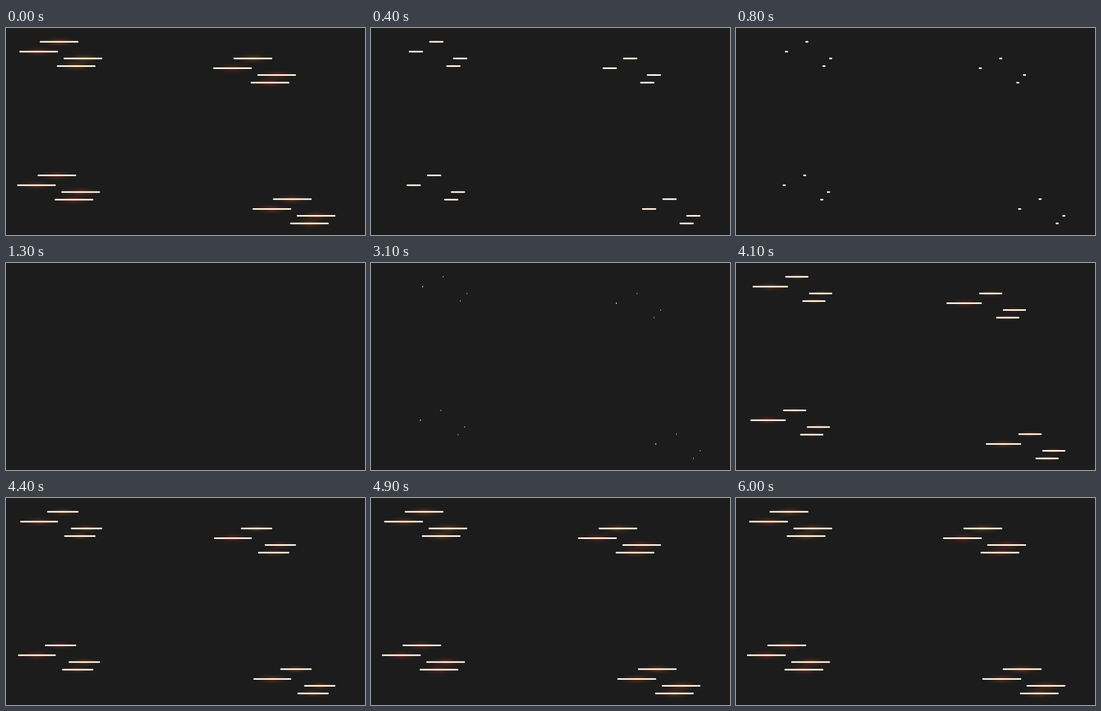
An HTML page with a canvas that plays this animation: 682x394 px, repeating every 6.2 s.

```html
<!DOCTYPE html>
<html lang="en">
<head>
<meta charset="utf-8">
<title>Glowing lines</title>
<style>
  html, body { margin: 0; width: 100%; height: 100%; overflow: hidden; background: #1c1c1c; }
  canvas { display: block; }
</style>
</head>
<body>
<canvas id="stage" width="682" height="394"></canvas>
<script>
const ctx = document.getElementById('stage').getContext('2d');
const LOOP = 6200, STEP = 100, LENGTH = 73.6, THICKNESS = 3;

// Right end and vertical centre of each line within a group
const lines = [[137.5, 26.3], [98.7, 45], [182.7, 57.9], [170, 72.4]];

// Group offset and the glow colour of its four lines
const ORANGE = '255,96,24', AMBER = '235,120,24', EMBER = '255,74,30', RED = '250,54,34';
const groups = [
  { x: 0, y: 0, glow: [ORANGE, EMBER, AMBER, AMBER] },
  { x: 368.2, y: 31.6, glow: [AMBER, RED, RED, RED] },
  { x: -4.2, y: 254.3, glow: [EMBER, RED, EMBER, RED] },
  { x: 443, y: 299.5, glow: [ORANGE, ORANGE, ORANGE, ORANGE] }
];

const clamp = v => Math.min(1, Math.max(0, v));
const progress = (time, start, duration) => clamp((time - start) / duration);
const sineInOut = p => (1 - Math.cos(Math.PI * p)) / 2;

// cubic-bezier(a, 0, b, 1)
const bezier = (a, b) => p => {
  let low = 0, high = 1;
  for (let i = 0; i < 24; i++) {
    const s = (low + high) / 2, r = 1 - s;
    if (3 * r * r * s * a + 3 * r * s * s * b + s * s * s < p) low = s; else high = s;
  }
  return low * low * (3 - 2 * low);
};
const easeShrink = bezier(0.2, 0.15);
const easeGrow = bezier(0.2, 0.11);

function lengthAt(time, index) {
  if (time > LOOP - 30) time -= LOOP;
  if (time < 2000) return LENGTH * (1 - easeShrink(progress(time, -30, 1300)));
  return LENGTH * (index === 1
    ? easeGrow(progress(time, 3020, 1800))
    : sineInOut(progress(time, 2960, 2030)));
}

function drawGlow(x, y, length, color) {
  const gradient = ctx.createRadialGradient(0, 0, 0, 0, 0, 1);
  [0.32, 0.22, 0.1, 0.03, 0].forEach((alpha, i) =>
    gradient.addColorStop(i / 4, `rgba(${color},${alpha})`));
  ctx.save();
  ctx.translate(x - length / 2, y);
  ctx.scale(length / 2, length * 0.15);
  ctx.fillStyle = gradient;
  ctx.fillRect(-1, -1, 2, 2);
  ctx.restore();
}

function drawLine(x, y, length) {
  ctx.fillStyle = '#fff5e4';
  ctx.beginPath();
  ctx.roundRect(x - length, y - THICKNESS / 2, length, THICKNESS, Math.min(0.8, length / 2));
  ctx.fill();
}

function draw(now) {
  const time = Math.floor(now % LOOP / STEP) * STEP;
  ctx.fillStyle = '#1c1c1c';
  ctx.fillRect(0, 0, 682, 394);
  for (const group of groups) {
    lines.forEach(([right, middle], i) => {
      const length = lengthAt(time, i);
      if (length < 0.1) return;
      const x = right + group.x, y = middle + group.y;
      drawGlow(x, y, length, group.glow[i]);
      drawLine(x, y, length);
    });
  }
}

let start;
function tick(now) {
  start ??= now;
  draw(now - start);
  requestAnimationFrame(tick);
}
draw(0);
requestAnimationFrame(tick);
</script>
</body>
</html>
```
